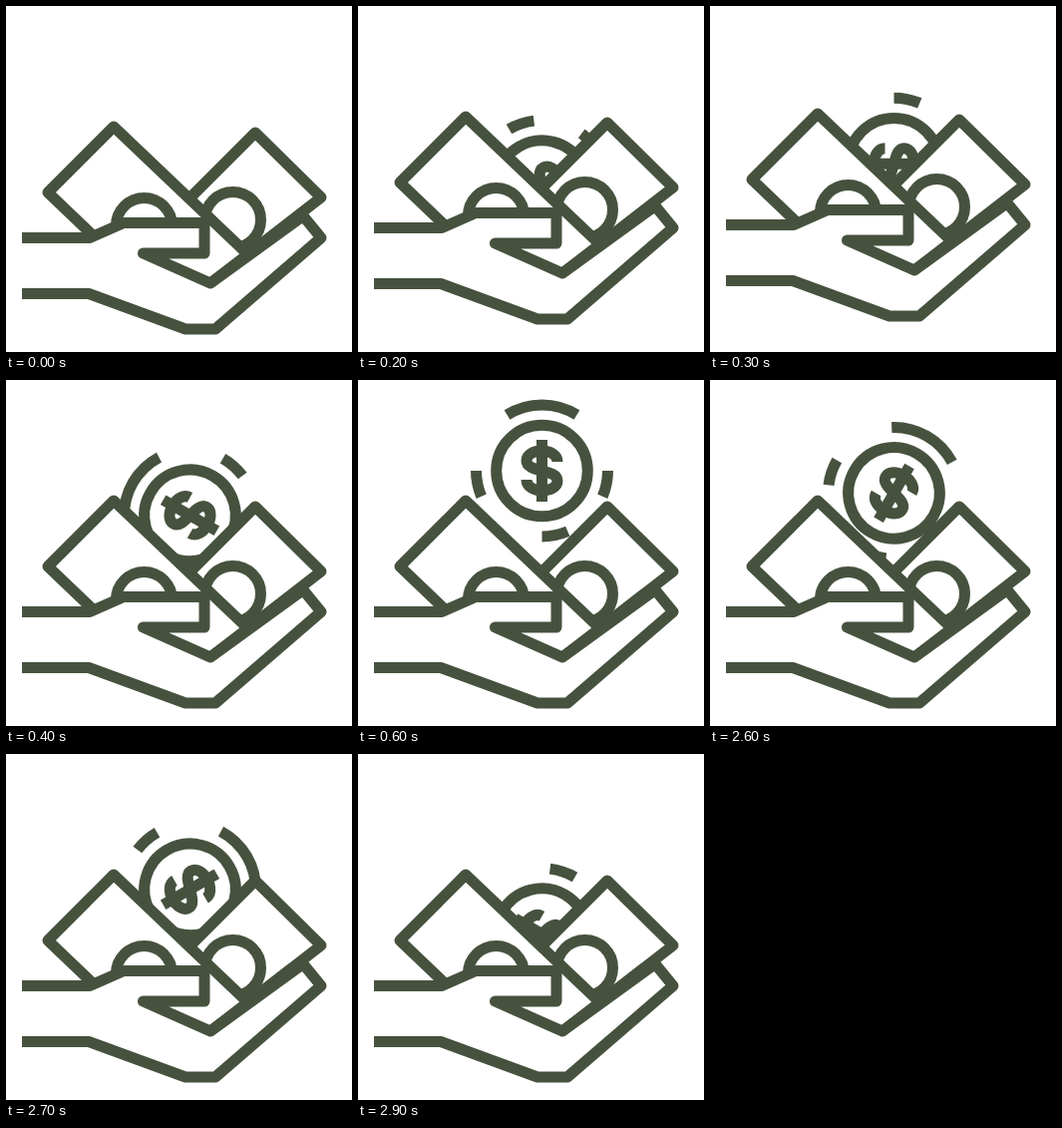
These frames come from a looping animation (347x347 px, 3 s). An HTML page:

```html
<!DOCTYPE html>
<html lang="en">
<head>
<meta charset="utf-8">
<title>Money in hand</title>
<style>
  html, body { margin: 0; width: 100%; height: 100%; overflow: hidden; background: #fff; }
  svg { display: block; width: 100vw; height: 100vh; }
  svg * { stroke: #46523e; stroke-width: 11; stroke-linejoin: round; }
  .line { fill: none; }
  .solid { fill: #fff; }
</style>
</head>
<body>
<svg viewBox="0 0 347 347">
  <g id="coin" class="line">
    <circle r="45.8"/>
    <circle r="66" pathLength="360" stroke-dasharray="23 44 23 67 23 58 64 58"/>
    <path d="M0 -31V31"/>
    <path d="M15.5 -9C15.5 -23.5 -15.5 -23.5 -15.5 -10C-15.5 2 15.5 -2 15.5 10C15.5 23.5 -15.5 23.5 -15.5 9"/>
  </g>
  <g id="hand" class="solid">
    <path d="M184 193L250 127L316 192L205 278"/>
    <circle cx="227.5" cy="214.5" r="28"/>
    <path d="M86 229L42 187L108 121L242.5 249L205 278"/>
    <circle cx="138.5" cy="220.5" r="28"/>
    <path d="M16 232.5H84L118 217.5H199V248H137.5L205 278L298 210.5L316 232.5L210 324H180L83 288.5H16"/>
  </g>
</svg>
<script>
  const coin = document.getElementById('coin');
  const hand = document.getElementById('hand');
  const LOOP = 3000, STEP = 100;
  const lift = { 2: -10, 3: -13 };

  function draw(now) {
    const step = Math.floor(now % LOOP / STEP);
    // Steps away from the resting pose: negative while rising, positive while sinking.
    const away = step < 26 ? Math.min(0, step - 6) : step - 25;
    coin.setAttribute('visibility', step < 2 ? 'hidden' : 'visible');
    coin.setAttribute('transform', `translate(184.5 ${91 + 22.4 * Math.abs(away)}) rotate(${30 * away})`);
    hand.setAttribute('transform', `translate(0 ${lift[step] || 0})`);
  }

  const start = performance.now();
  function tick() {
    draw(performance.now() - start);
    requestAnimationFrame(tick);
  }
  tick();
</script>
</body>
</html>
```
